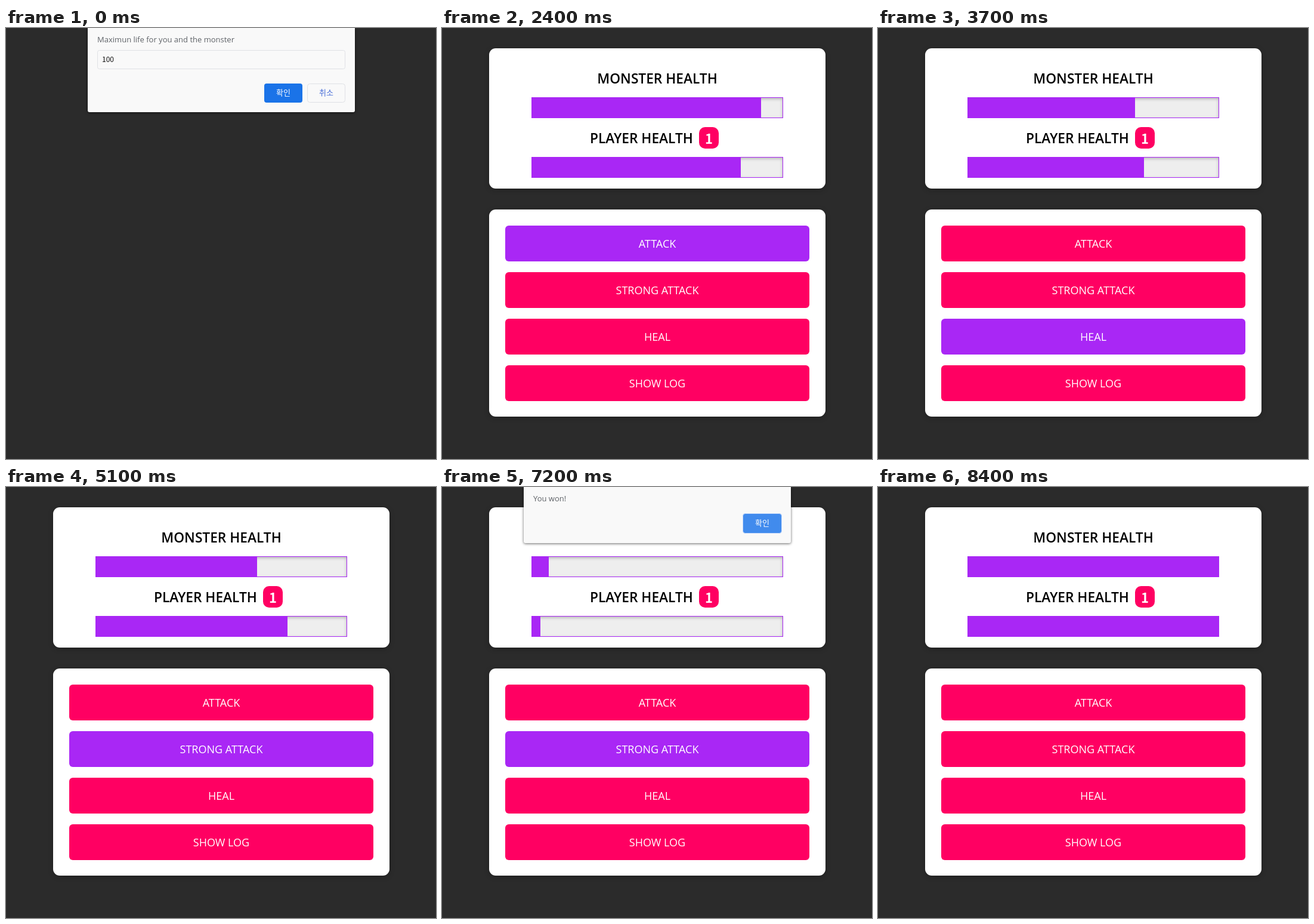
Animation of 721x722 px, one loop 9000 ms. Source, as an HTML page:

```html
<!DOCTYPE html>
<html lang="ko">
<head>
<meta charset="utf-8">
<title>Monster game</title>
<style>
  :root {
    --pink: #ff0062;
    --purple: #a927f5;
    --loop: 9s infinite;
    --korean: "Noto Sans CJK KR", "Noto Sans CJK", "Noto Sans CJK JP", sans-serif;
  }
  html, body {
    margin: 0;
    width: 100%;
    height: 100%;
    overflow: hidden;
    background: #2b2b2b;
  }
  body { position: relative; }
  div, svg { position: absolute; box-sizing: border-box; }
  svg { left: 0; top: 0; overflow: visible; }
  text { font-family: "Open Sans", "Noto Sans", sans-serif; }

  .panel {
    left: 79px;
    width: 564px;
    border-radius: 11px;
    background: #fff;
    box-shadow: 0 2px 8px rgba(0, 0, 0, .26);
  }
  .status { top: 34px; height: 235px; }
  .controls { top: 304px; height: 347px; }

  .bar {
    left: 150px;
    width: 422px;
    height: 35px;
    border: 1px solid var(--purple);
    background: #eee;
    box-shadow: inset 0 2px 5px rgba(0, 0, 0, .25);
  }
  .bar div {
    left: 0;
    top: 0;
    width: 420px;
    height: 33px;
    background: var(--purple);
  }
  .monster { top: 116px; }
  .player { top: 216px; }
  .monster div { animation: monster var(--loop) ease-out; }
  .player div { animation: player var(--loop) ease-out; }

  .title { font-size: 22.7px; font-weight: 600; }
  .lives { font: 700 22px var(--korean); fill: #fff; text-anchor: middle; }
  .mid { text-anchor: middle; }
  .btn { fill: var(--pink); }
  .label { font-size: 18px; fill: #fff; text-anchor: middle; }
  .attack { animation: attack var(--loop) step-end; }
  .strong { animation: strong var(--loop) step-end; }
  .heal { animation: heal var(--loop) step-end; }

  .dialog {
    left: 137px;
    top: 0;
    width: 448px;
    background: #f9f9f9;
    border-radius: 0 0 3px 3px;
    box-shadow: 0 1px 4px rgba(0, 0, 0, .6);
  }
  .dialog text { font-size: 13px; fill: #5f6368; }
  .dialog .ko { font-family: var(--korean); text-anchor: middle; }
  .dialog .value { font: 12px var(--korean); fill: #111; }
  .dialog .on { fill: #fff; }
  .dialog .off { fill: #4a6fd8; }
  .outline { fill: none; stroke: #dfe1e5; }
  .prompt { height: 141px; animation: prompt var(--loop) step-end; }
  .alert { height: 94px; opacity: 0; animation: alert var(--loop) linear; }
  .game { inset: 0; animation: game var(--loop) step-end; }

  @keyframes prompt { 0% { visibility: visible } 8.888%, 100% { visibility: hidden } }
  @keyframes game { 0% { visibility: hidden } 8.888%, 100% { visibility: visible } }
  @keyframes alert {
    0%, 77.2% { opacity: 0 }
    80%, 88.8% { opacity: 1 }
    91.1%, 100% { opacity: 0 }
  }
  @keyframes attack {
    0%, 27.777%, 100% { fill: var(--pink) }
    16.666% { fill: var(--purple) }
  }
  @keyframes strong {
    0%, 40%, 90%, 100% { fill: var(--pink) }
    27.777%, 52.222% { fill: var(--purple) }
  }
  @keyframes heal {
    0%, 52.222%, 100% { fill: var(--pink) }
    41.111% { fill: var(--purple) }
  }
  @keyframes monster {
    0%, 19.44% { width: 420px }
    21.67%, 25% { width: 402px }
    26.66%, 31.67% { width: 384px }
    34%, 35% { width: 329px }
    37.33%, 56.11% { width: 280px }
    57.77%, 59.44% { width: 260px }
    61.67%, 62.22% { width: 224px }
    64.44%, 65% { width: 180px }
    67.22%, 67.78% { width: 139px }
    70%, 70.56% { width: 95px }
    72.78%, 73.33% { width: 60px }
    75.56%, 90.56% { width: 28px }
    93.33%, 100% { width: 420px }
  }
  @keyframes player {
    0%, 19.44% { width: 420px }
    21.67%, 25% { width: 392px }
    26.66%, 31.67% { width: 350px }
    34%, 35% { width: 319px }
    37.33%, 45% { width: 295px }
    47.33%, 56.11% { width: 328px }
    57.77%, 59.44% { width: 313px }
    61.67%, 62.22% { width: 259px }
    64.44%, 65% { width: 204px }
    67.22%, 67.78% { width: 149px }
    70%, 70.56% { width: 97px }
    72.78%, 73.33% { width: 55px }
    75.56%, 90.56% { width: 14px }
    93.33%, 100% { width: 420px }
  }
</style>
</head>
<body>
  <div class="game">
    <div class="panel status"></div>
    <div class="panel controls"></div>
    <div class="bar monster"><div></div></div>
    <div class="bar player"><div></div></div>
    <svg width="721" height="722">
      <text class="title mid" x="361" y="93">MONSTER HEALTH</text>
      <text class="title" x="248" y="193">PLAYER HEALTH</text>
      <rect class="btn" x="431" y="166" width="33" height="36" rx="10"/>
      <text class="lives" x="447.5" y="194">1</text>
      <rect class="btn attack" x="106" y="331" width="510" height="60" rx="6"/>
      <rect class="btn strong" x="106" y="409" width="510" height="60" rx="6"/>
      <rect class="btn heal" x="106" y="487" width="510" height="60" rx="6"/>
      <rect class="btn" x="106" y="565" width="510" height="60" rx="6"/>
      <text class="label" x="361" y="368">ATTACK</text>
      <text class="label" x="361" y="446">STRONG ATTACK</text>
      <text class="label" x="361" y="524">HEAL</text>
      <text class="label" x="361" y="602">SHOW LOG</text>
    </svg>
  </div>

  <div class="dialog alert">
    <svg width="448" height="94">
      <text x="16" y="24">You won!</text>
      <rect x="367.5" y="44.5" width="65" height="33" rx="4" fill="#418bed" stroke="#c6dafc"/>
      <text class="ko on" x="400" y="65">확인</text>
    </svg>
  </div>

  <div class="dialog prompt">
    <svg width="448" height="141">
      <text x="16" y="24">Maximun life for you and the monster</text>
      <rect class="outline" x="16.5" y="37.5" width="415" height="31" rx="3"/>
      <text class="value" x="24" y="57">100</text>
      <rect x="296" y="93" width="64" height="32" rx="4" fill="#1a73e8"/>
      <text class="ko on" x="328" y="113">확인</text>
      <rect class="outline" x="368.5" y="93.5" width="63" height="31" rx="4"/>
      <text class="ko off" x="400" y="113">취소</text>
    </svg>
  </div>
</body>
</html>
```
